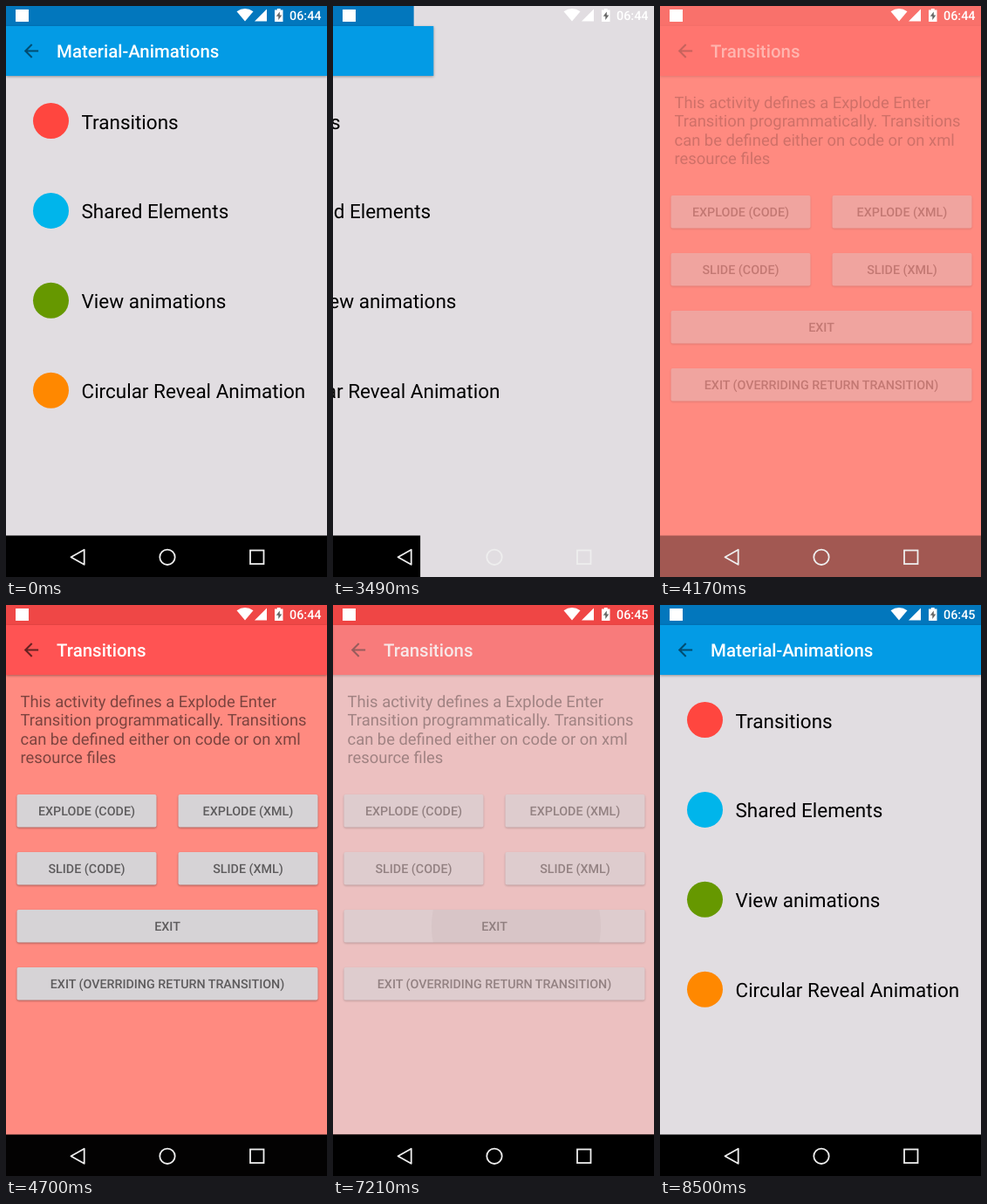
Animation, 368 px wide and 654 px high, one loop 9740 ms. Source, as an HTML page:

```html
<!DOCTYPE html>
<html lang="en">
<head>
<meta charset="utf-8">
<title>Activity transitions</title>
<style>
  html, body { margin: 0; width: 100%; height: 100%; overflow: hidden; }
  svg { display: block; width: 368px; height: 654px; font-family: Roboto, sans-serif; text-rendering: geometricPrecision; }
  .title { font-size: 20.44px; font-weight: 500; fill: #fff; }
  .item { font-size: 22.49px; }
  .body { font-size: 18.4px; fill: rgba(0, 0, 0, .52); }
  .label { font-size: 14.31px; font-weight: 500; fill: rgba(0, 0, 0, .57); text-anchor: middle; }
  .clock { font-size: 14.4px; font-weight: 500; text-anchor: end; }
  .bar { filter: drop-shadow(0 1px 1.5px rgba(0, 0, 0, .35)); }
  .button { fill: #d6d4d7; filter: drop-shadow(0 1px 1px rgba(0, 0, 0, .35)); }
</style>
</head>
<body>
<svg viewBox="0 0 368 654">
  <defs>
    <path id="arrow" transform="translate(16.7 39.2) scale(1.022)" d="M20 11H7.83l5.59-5.59L12 4l-8 8 8 8 1.41-1.41L7.83 13H20z"/>
    <clipPath id="exitClip"><rect x="12.5" y="349" width="345" height="37.5" rx="2"/></clipPath>
  </defs>

  <rect width="368" height="654" fill="#e1dde1"/>
  <g id="list">
    <rect data-distance="500" data-system="1" width="368" height="23" fill="#0277bd"/>
    <rect data-distance="487" data-system="1" y="606.5" width="368" height="48"/>
    <g data-distance="460">
      <rect class="bar" y="23" width="368" height="57" fill="#039be5"/>
      <use href="#arrow" opacity=".5"/>
      <text class="title" x="58" y="59">Material-Animations</text>
    </g>
  </g>

  <rect id="detailBack" width="368" height="654" fill="#ff8a80"/>
  <g id="detailBars">
    <rect width="368" height="23" fill="#ef4645"/>
    <rect y="606.5" width="368" height="48"/>
  </g>
  <g id="detail">
    <rect class="bar" y="23" width="368" height="57" fill="#ff5252"/>
    <use href="#arrow" opacity=".6"/>
    <text class="title" x="58" y="59">Transitions</text>
    <g id="buttons"></g>
    <circle id="ripple" cx="210" cy="368" fill="rgba(0,0,0,.05)" clip-path="url(#exitClip)"/>
    <g id="labels"></g>
  </g>

  <g fill="#fff">
    <rect x="11" y="4" width="15" height="14"/>
    <path d="M274 17.5L264.5 6.2Q274 0 283.500 6.2z"/>
    <path d="M285 17.500H299V3.500z"/>
    <path d="M308 4.500h2.800v-1.500h3.900v1.500h2.800v13.500h-9.500z"/>
    <path d="M313.800 6.500l-4 5.200h2.500v4.300l4-5.500h-2.500z" fill="#333" opacity=".75"/>
    <text id="clock" class="clock" x="361.500" y="16"></text>
  </g>
  <g fill="none" stroke="#eee" stroke-width="1.8">
    <path d="M74.500 631.300L89.700 622.800V639.800z" stroke-linejoin="round"/>
    <circle cx="185" cy="631.300" r="8.700"/>
    <rect x="280" y="623.500" width="15.500" height="15.500"/>
  </g>
  <circle id="touch" r="11" fill="rgba(245,243,250,.7)" stroke="rgba(130,120,165,.45)" stroke-width="1.500"/>
</svg>

<script>
const LOOP = 9740, WIDTH = 368, SLIDE = 560, FADE = 850;
const EXIT = 3000, ENTER = 3860, RETURN = 6890, REENTER = 7750;
const NEAREST = 151, FARTHEST = 513;

const $ = id => document.getElementById(id);
const clamp = v => Math.min(1, Math.max(0, v));
const progress = (t, start, duration) => clamp((t - start) / duration);
const add = (parent, markup) => parent.insertAdjacentHTML('beforeend', markup);

const list = $('list');
[['Transitions', '#ff463f'], ['Shared Elements', '#00b5eb'],
 ['View animations', '#669800'], ['Circular Reveal Animation', '#ff8800']].forEach(([name, color], i) => {
  const y = 131.5 + i * 102.9, rise = Math.abs(327 - y);
  add(list, `<circle data-distance="${317 + rise}" cx="51.5" cy="${y}" r="20.5" fill="${color}"/>
    <text data-distance="${141 + rise}" class="item" x="86.500" y="${y + 9}">${name}</text>`);
});

['This activity defines a Explode Enter', 'Transition programmatically. Transitions',
 'can be defined either on code or on xml', 'resource files'].forEach((line, i) =>
  add($('labels'), `<text class="body" x="16.500" y="${116.7 + i * 21.56}">${line}</text>`));

function addButton(label, x, y, width) {
  add($('buttons'), `<rect class="button" x="${x}" y="${y}" width="${width}" height="37.5" rx="2"/>`);
  add($('labels'), `<text class="label" x="${x + width / 2}" y="${y + 24.3}">${label}</text>`);
}
addButton('EXPLODE (CODE)', 12.5, 217, 160);
addButton('EXPLODE (XML)', 197.5, 217, 160);
addButton('SLIDE (CODE)', 12.5, 283, 160);
addButton('SLIDE (XML)', 197.5, 283, 160);
addButton('EXIT', 12.5, 349, 345);
addButton('EXIT (OVERRIDING RETURN TRANSITION)', 12.5, 415, 345);

const views = [...list.children].map(el => ({
  el, distance: +el.dataset.distance, system: !!el.dataset.system
}));

// Views far from the left edge's opposite side leave first and come back last.
const delay = gap => SLIDE / 3 * gap / WIDTH;

function slideOffset(t, { distance, system }) {
  if (t < 5000) return -WIDTH * progress(t, EXIT + delay(FARTHEST - distance), SLIDE) ** 2;
  if (system) return 0;
  return -WIDTH * (1 - progress(t, REENTER + delay(distance - NEAREST), SLIDE)) ** 2;
}

function render(t) {
  for (const view of views)
    view.el.setAttribute('transform', `translate(${slideOffset(t, view)} 0)`);

  const fadeIn = progress(t, ENTER, FADE);
  $('detail').setAttribute('opacity', fadeIn * (1 - progress(t, RETURN, FADE)));
  $('detailBars').setAttribute('opacity', t < 7400 ? fadeIn : 0);
  $('detailBack').setAttribute('opacity', progress(t, 3850, 310) * (1 - progress(t, 6950, 400)));

  $('ripple').setAttribute('r', 97 * Math.max(0, (t - 6560) / 650) ** 0.73);
  $('clock').textContent = t < 5800 ? '06:44' : '06:45';

  const first = t < 5000, touch = $('touch');
  touch.setAttribute('cx', first ? 165 : 220);
  touch.setAttribute('cy', first ? 142 : 362);
  touch.setAttribute('opacity', first
    ? (t >= 2880) * (1 - progress(t, 2960, 60))
    : (t >= 6510) * (1 - progress(t, 6870, 90)));
}

const began = performance.now();
function tick() {
  render((performance.now() - began) % LOOP);
  requestAnimationFrame(tick);
}
tick();
</script>
</body>
</html>
```
